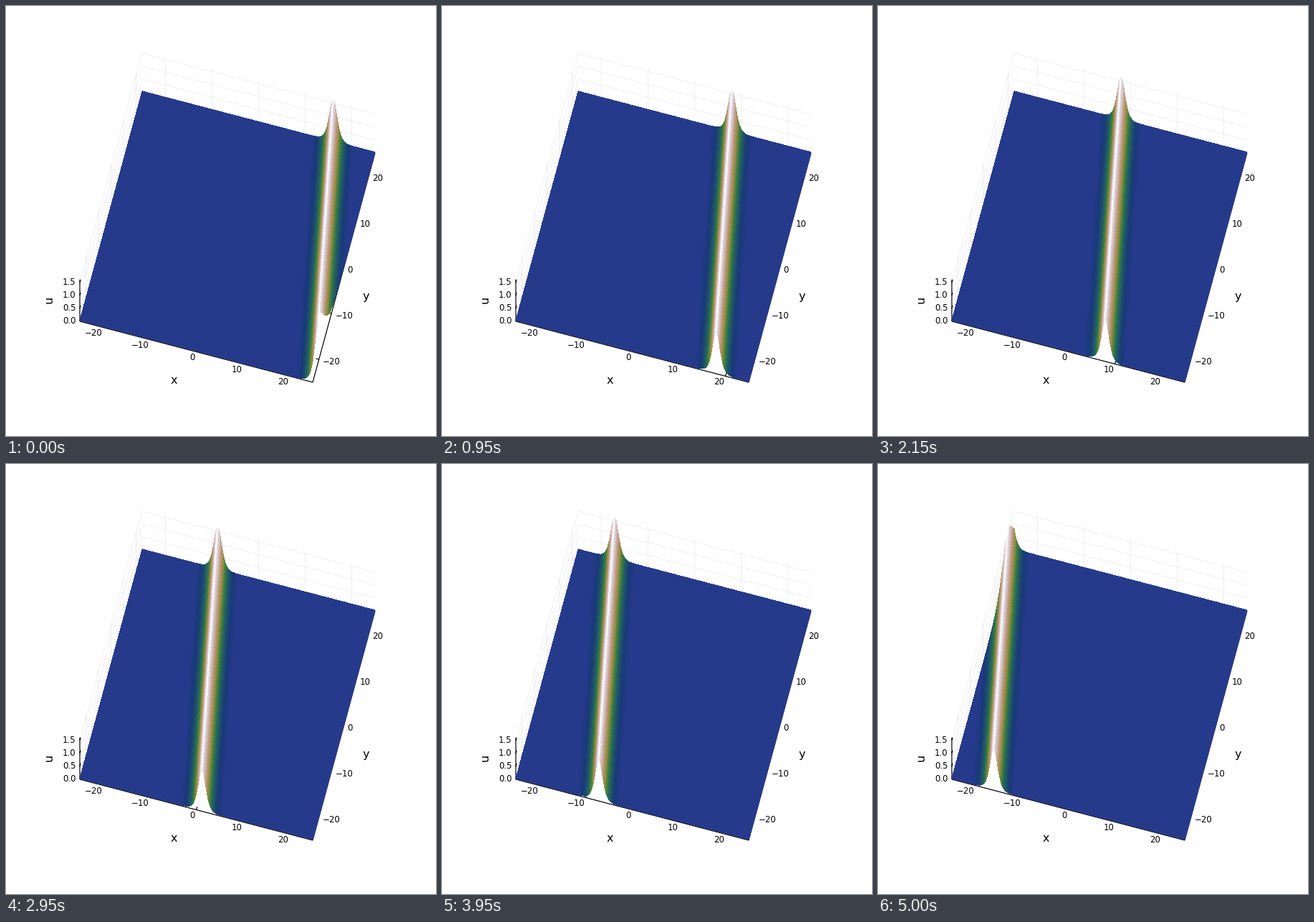
Recreate the animation shown at these times as a matplotlib script. Size 600x600 px, loop 5050 ms.

```python
import numpy as np
import matplotlib.pyplot as plt
from matplotlib.animation import FuncAnimation
from matplotlib.collections import LineCollection, PolyCollection
from matplotlib.colors import LinearSegmentedColormap

DPI = 100
FRAMES = 101
L = 25.0            # half width of the domain
K1, K2 = 1.0, -0.8  # line soliton parameters
AMP = (K1 - K2) ** 2 / 2
SLOPE = K1 + K2
SPEED = K1 * K1 + K1 * K2 + K2 * K2

STOPS = [
    (0.00, (38, 58, 140)), (0.007, (25, 57, 120)), (0.035, (30, 84, 106)),
    (0.11, (44, 116, 76)), (0.21, (86, 131, 58)), (0.33, (140, 141, 66)),
    (0.50, (178, 145, 98)), (0.66, (194, 160, 138)),
    (0.85, (210, 192, 198)), (0.95, (224, 214, 220)), (1.00, (255, 255, 255)),
]
CMAP = LinearSegmentedColormap.from_list(
    "relief", [(p, tuple(c / 255 for c in rgb)) for p, rgb in STOPS], N=2048)


def project(x, y, z=0.0):
    """Orthographic view: data coordinates to stage pixels."""
    px = 103 + 6.5 * (x + L) + 1.74 * (y + L)
    py = 440 + 1.7 * (x + L) - 6.4 * (y + L) - 36 * z
    return np.stack(np.broadcast_arrays(px, py), axis=-1)


def height(x, y, t):
    return AMP / np.cosh((K1 - K2) / 2 * (x + SLOPE * y + SPEED * t)) ** 2


ROWS = np.linspace(L, -L, 101)[:, None]
# columns follow the ridge; the two end ones reach the domain edges
OFFSETS = np.concatenate([[-4 * L], np.linspace(-6, 6, 81), [4 * L]])


def surface(t):
    """Quads ordered from back to front, with their colours."""
    x = np.clip(OFFSETS - SLOPE * ROWS - SPEED * t, -L, L)
    z = height(x, ROWS, t)
    p = project(x, ROWS, z) - (0, 1.1)
    quads = np.stack([p[1:, :-1], p[1:, 1:], p[:-1, 1:], p[:-1, :-1]], axis=2)
    mean = (z[1:, :-1] + z[1:, 1:] + z[:-1, 1:] + z[:-1, :-1]) / 4
    return quads.reshape(-1, 4, 2), CMAP(mean.ravel() / AMP)


fig = plt.figure(figsize=(6, 6), dpi=DPI, facecolor="white")
ax = fig.add_axes([0, 0, 1, 1])
ax.set_xlim(0, 600)
ax.set_ylim(600, 0)
ax.axis("off")
plt.rcParams["font.family"] = "DejaVu Sans"


def pt(px):
    return px * 72 / DPI


def segments(pairs, color, width, order):
    lines = [[project(*a), project(*b)] for a, b in pairs]
    ax.add_collection(LineCollection(lines, colors=color, linewidths=pt(width),
                                     zorder=order, snap=False))


def label(x, y, s, size=11.7, **kw):
    ax.text(x, y, s, fontsize=pt(size), color="black", **kw)


TICKS = range(-20, 21, 10)
ZTICKS = (0.0, 0.5, 1.0, 1.5)

grid = []
for v in TICKS:
    grid += [((v, L, 0), (v, L, AMP)), ((-L, v, 0), (-L, v, AMP)),
             ((v, -L, 0), (v, L, 0)), ((-L, v, 0), (L, v, 0))]
for z in ZTICKS:
    grid += [((-L, L, z), (L, L, z)), ((-L, -L, z), (-L, L, z))]
segments(grid, (0, 0, 0, 0.1), 0.6, 1)

axes = [((-L, -L, 0), (L, -L, 0)), ((L, -L, 0), (L, L, 0)),
        ((-L, -L, 0), (-L, -L, AMP))]
for v in TICKS:
    axes += [((v, -L, 0), (v, -L + 0.65, 0)), ((L, v, 0), (L - 0.65, v, 0))]
for z in ZTICKS:
    axes.append(((-L, -L, z), (-L, -L + 0.65, z)))
segments(axes, "black", 1.2, 2)

for v in TICKS:
    s = str(v).replace("-", "\u2212")
    x, y = project(v, -L)
    label(x - 1.4, y + 11.3, s, ha="right")
    x, y = project(L, v)
    label(x + 5.2, y + 6.8, s, ha="left")
for z in ZTICKS:
    label(97.3, 443 - 36 * z, f"{z:.1f}", ha="right")
label(234.5, 526.8, "x", 16, ha="center")
label(502, 410, "y", 16, ha="center")
label(60, 409.5, "u", 16, ha="center", va="center", rotation=90)

mesh = PolyCollection([], edgecolors="none", linewidths=0, antialiaseds=False,
                      zorder=3)
ax.add_collection(mesh, autolim=False)


def draw(n):
    quads, colors = surface(-L + 0.5 * n)
    mesh.set_verts(quads)
    mesh.set_facecolor(colors)
    return (mesh,)


anim = FuncAnimation(fig, draw, frames=FRAMES, interval=50, repeat=True,
                     repeat_delay=0, blit=False)
plt.show()
```
